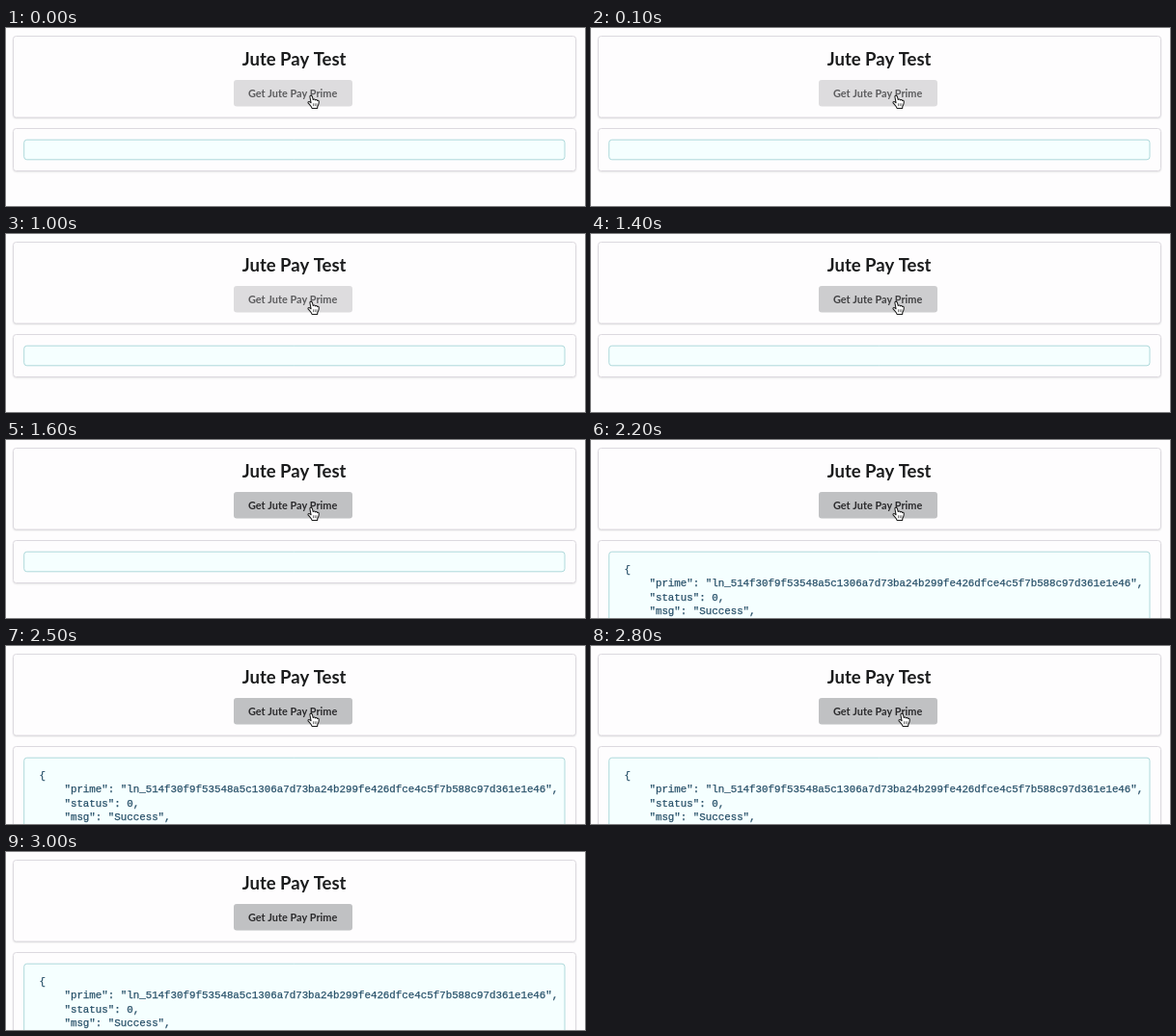
Recreate the animation shown at these times as an HTML page with a canvas. Size 600 by 185 pixels, loop 3100 ms.

```html
<!DOCTYPE html>
<html lang="en">
<head>
<meta charset="utf-8">
<title>Jute Pay Test</title>
<style>
  html, body { margin: 0; width: 100%; height: 100%; overflow: hidden; background: #fefefe; }
  canvas { display: block; width: 600px; height: 185px; }
</style>
</head>
<body>
<canvas id="stage"></canvas>
<script>
const W = 600, H = 185, LOOP = 3100, STEP = 100;
const canvas = document.getElementById('stage');
const ctx = canvas.getContext('2d');
const dpr = window.devicePixelRatio || 1;
canvas.width = W * dpr;
canvas.height = H * dpr;

const SANS = 'Lato, sans-serif';
const MONO = '"Liberation Mono", monospace';
const PAPER = '#fefdfe';
const RESULT = [
  '{',
  '    "prime": "ln_514f30f9f53548a5c1306a7d73ba24b299fe426dfce4c5f7b588c97d361e1e46",',
  '    "status": 0,',
  '    "msg": "Success",'
];

const clamp01 = v => Math.max(0, Math.min(1, v));
const mix = (a, b, k) => a.map((v, i) => Math.round(v + (b[i] - v) * k));
const rgb = c => `rgb(${c.join(',')})`;

function box(x, y, w, h, r, fill, stroke) {
  ctx.beginPath();
  ctx.roundRect(x, y, w, h, r);
  ctx.fillStyle = fill;
  ctx.fill();
  if (stroke) {
    ctx.strokeStyle = stroke;
    ctx.lineWidth = 1;
    ctx.stroke();
  }
}

function card(y, h) {
  ctx.save();
  ctx.shadowColor = 'rgba(34,36,38,0.16)';
  ctx.shadowBlur = 2 * dpr;
  ctx.shadowOffsetY = dpr;
  box(7.5, y, 583, h, 3, PAPER);
  ctx.restore();
  box(7.5, y, 583, h, 3, PAPER, '#dcd9df');
}

function text(str, x, y, font, color, align) {
  ctx.font = font;
  ctx.fillStyle = color;
  ctx.textAlign = align;
  ctx.fillText(str, x, y);
}

// Pressing darkens the button quickly, easing out.
function button(t) {
  const k = t < 1400 ? 0 : 1 - (1 - clamp01((t - 1300) / 300)) ** 2;
  const face = mix([221, 220, 222], [192, 193, 195], k);
  const ink = mix([92, 92, 94], [42, 42, 44], k);
  box(236, 54, 123, 27.5, 3, rgb(face));
  text('Get Jute Pay Prime', 343.2, 71.9, `bold 10.9px ${SANS}`, rgb(ink), 'right');
}

function result(open) {
  card(104.5, open ? 110 : 44);
  box(18.7, 116.2, 560.3, open ? 90 : 20.6, 3, '#f5ffff', '#aed9db');
  if (!open) return;
  // A faint outline gives the code its heavier weight.
  ctx.strokeStyle = '#285069';
  ctx.lineWidth = 0.25;
  RESULT.forEach((line, i) => {
    const y = 137.9 + i * 14.5;
    text(line, 34.5, y, `10.8px ${MONO}`, '#285069', 'left');
    ctx.strokeText(line, 34.5, y);
  });
}

function hand(x, y) {
  ctx.save();
  ctx.translate(x, y);
  ctx.beginPath();
  ctx.moveTo(2.4, 1.4);
  ctx.bezierCurveTo(2.2, 0, 4.4, -0.3, 4.9, 1.3);
  ctx.lineTo(5.8, 4.5);
  ctx.bezierCurveTo(6.3, 3.7, 7.8, 3.9, 8, 4.9);
  ctx.bezierCurveTo(8.6, 4.2, 9.8, 4.6, 10, 5.5);
  ctx.bezierCurveTo(11, 5, 11.8, 5.7, 11.8, 6.7);
  ctx.bezierCurveTo(11.9, 9, 11, 10.4, 10.3, 11.6);
  ctx.lineTo(10.2, 13.4);
  ctx.lineTo(4.6, 13.4);
  ctx.bezierCurveTo(4.2, 11.6, 1.8, 9.4, 0.6, 7.9);
  ctx.bezierCurveTo(0, 6.8, 1.4, 6, 2.4, 6.8);
  ctx.lineTo(3.6, 7.8);
  ctx.closePath();
  ctx.fillStyle = '#fff';
  ctx.fill();
  ctx.strokeStyle = '#1c1c1c';
  ctx.lineWidth = 1.05;
  ctx.lineJoin = 'round';
  ctx.stroke();
  ctx.beginPath();
  for (const fx of [5.9, 7.6, 9.3]) {
    ctx.moveTo(fx, 8.3);
    ctx.lineTo(fx + 0.15, 11.2);
  }
  ctx.lineWidth = 0.6;
  ctx.stroke();
  ctx.restore();
}

function draw(t) {
  ctx.setTransform(dpr, 0, 0, dpr, 0, 0);
  ctx.fillStyle = PAPER;
  ctx.fillRect(0, 0, W, H);
  card(8.5, 84.5);
  text('Jute Pay Test', 352.4, 38.7, `bold 18.5px ${SANS}`, '#1b1c1d', 'right');
  button(t);
  result(t >= 2200);
  const drift = clamp01((t - 2500) / 300) ** 2 * 6;
  if (t < 3000) hand(312.5 + drift, 70);
}

const start = performance.now();
function tick() {
  const t = (performance.now() - start) % LOOP;
  draw(Math.floor(t / STEP) * STEP);
  requestAnimationFrame(tick);
}
tick();
</script>
</body>
</html>
```
